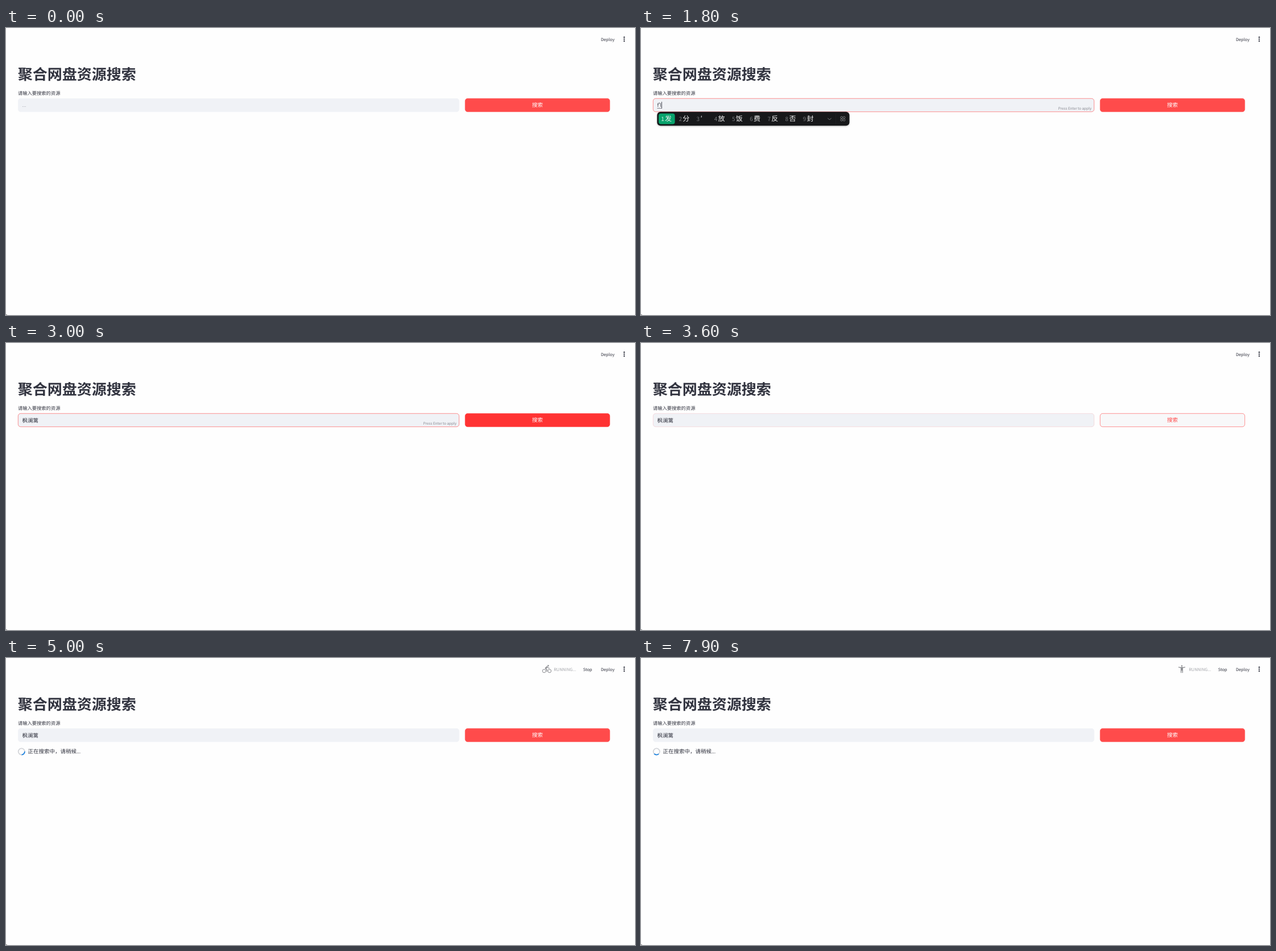
Recreate the animation shown at these times as an HTML page. Size 1106 px wide and 506 px high, loop 8 s.

```html
<!DOCTYPE html>
<html lang="zh-CN">
<head>
<meta charset="utf-8">
<title>聚合网盘资源搜索</title>
<style>
  html, body { margin: 0; width: 100%; height: 100%; overflow: hidden; background: #fefefe; }
  svg { display: block; width: 100%; height: 100%; }
  text {
    font-family: "Noto Sans CJK SC", "Noto Sans CJK", "Noto Sans", sans-serif;
    white-space: pre; text-rendering: geometricPrecision;
  }
</style>
</head>
<body>
<svg id="stage" viewBox="0 0 1106 506"></svg>
<script>
const LOOP = 8000, STEP = 100;
const INK = '#31333f', RED = '#ff4b4b', HOVER = '#ff3333';
const WORD = '枫澜篱';

// Toolbar figures on a 24 unit grid
const wheel = x => `M${x} 12c-2.8 0-5 2.2-5 5s2.2 5 5 5 5-2.2 5-5-2.2-5-5-5z` +
  'm0 8.5c-1.9 0-3.5-1.6-3.5-3.5s1.6-3.5 3.5-3.5 3.5 1.6 3.5 3.5-1.6 3.5-3.5 3.5z';
const head = (x, y) => `M${x} ${y}a2 2 0 1 0 0-4 2 2 0 0 0 0 4z`;
const FIGURES = {
  stand: head(12, 6) + 'M20.5 6c-2.6.7-5.7 1-8.5 1s-5.9-.3-8.5-1L3 8c1.9.5 4 .8 6 1v13h2v-6h2v6h2V9c2-.2 4.1-.5 6-1z',
  bike: head(15.5, 5.5) + wheel(5) + wheel(19) +
    'M10.8 10.5l2.4-2.4.8.8c1.3 1.3 3 2.1 5.1 2.1V9c-1.5 0-2.7-.6-3.6-1.5l-1.9-1.9c-.5-.4-1-.6-1.6-.6' +
    's-1.1.2-1.4.6L7.8 8.4c-.4.4-.6.9-.6 1.4 0 .6.2 1.1.6 1.4L11 14v5h2v-6.2z',
  run: head(13.5, 5.5) + 'M9.9 19.4l1-4.4 2.1 2v6h2v-7.5l-2.1-2 .6-3c1.3 1.5 3.3 2.5 5.5 2.5v-2c-1.9 0-3.5-1-4.3-2.4' +
    'l-1-1.6c-.4-.6-1-1-1.7-1-.3 0-.5.1-.8.1L6 8.3V13h2V9.6l1.8-.7L8.2 17l-4.9-1-.4 2z'
};

const stage = document.getElementById('stage');

function add(tag, attrs, parent = stage, content = '') {
  const el = document.createElementNS('http://www.w3.org/2000/svg', tag);
  set(el, attrs);
  el.textContent = content;
  parent.append(el);
  return el;
}
function set(el, attrs) {
  for (const k in attrs) el.setAttribute(k, attrs[k]);
}
const label = (str, x, y, size, fill = INK, parent = stage, more = {}) =>
  add('text', { x, y, 'font-size': size, fill, ...more }, parent, str);
const show = (el, on) => el.setAttribute('visibility', on ? 'visible' : 'hidden');
const between = (t, a, b) => t >= a && t < b;
const clamp = v => Math.max(0, Math.min(1, v));

// Rounded box whose hairline border lies inside its edges
const box = (x, width, attrs) => add('rect', {
  x: x + 0.3, y: 124.3, width: width - 0.6, height: 23.4, rx: 4.5, 'stroke-width': 0.6, ...attrs
});

// Page
add('rect', { width: 1106, height: 506, fill: '#fefefe' });
add('rect', { y: 505, width: 2, height: 1, fill: '#888' });
label('Deploy', 1046, 22.5, 7.35);
for (const y of [16.2, 19.6, 23]) add('circle', { cx: 1087, cy: y, r: 1.2, fill: INK });
label('聚合网盘资源搜索', 20.8, 91.1, 26, INK, stage, { 'font-weight': 700 });
label('请输入要搜索的资源', 21, 117.6, 8.27);

// Input
box(21, 776, { fill: '#f0f2f6', stroke: '#f0f2f6' });
const ring = box(21, 776, { fill: 'none', stroke: RED });
const hint = label('...', 28.3, 139.2, 8.5, '#a3a5ad');
const typed = label('', 28.4, 139.4, 8.5);
const under = add('rect', { x: 28.4, y: 141.3, height: 0.6, fill: INK });
const value = label(WORD, 28.4, 139.5, 9.5);
const caret = add('rect', { y: 130, width: 0.8, height: 12, fill: INK });
const apply = label('Press Enter to apply', 792, 143.9, 6.3, '#83858d', stage, { 'text-anchor': 'end' });

// Button
const button = box(807, 255, {});
const buttonText = label('搜索', 934.4, 139.1, 9.5, '#fff', stage, { 'text-anchor': 'middle' });

// Candidate popup
function makePopup(words) {
  const g = add('g', {});
  add('rect', { x: 28.3, y: 147.8, width: 338.2, height: 24.4, rx: 6, fill: '#17181a',
    style: 'filter:drop-shadow(0 1px 1.5px rgba(0,0,0,.25))' }, g);
  add('rect', { x: 31, y: 150.7, width: 16.6 + 12 * words[0].length, height: 18.8, rx: 4, fill: '#08a36c' }, g);
  let x = 35.2;
  words.forEach((word, i) => {
    label(i + 1, x, 163.8, 10, i ? '#77797c' : '#d5f3e6', g, { 'font-weight': 300 });
    label(word, x + 6.8, 164.4, 12, '#f4f4f4', g, { 'font-weight': 300 });
    x += 19.2 + 12 * word.length;
  });
  const line = { fill: 'none', stroke: '#85878a', 'stroke-width': 0.9 };
  add('path', { d: 'M328.3 158.8l3.2 3.2 3.2-3.2', ...line }, g);
  add('rect', { x: 342, y: 151, width: 0.6, height: 18, fill: '#242527' }, g);
  for (const cx of [352.7, 357.1])
    for (const cy of [157.8, 162.2]) add('rect', { x: cx - 1.7, y: cy - 1.7, width: 3.4, height: 3.4, rx: 1.3, ...line }, g);
  return g;
}
const letters = makePopup(['发', '分', '′', '放', '饭', '费', '反', '否', '封']);
const phrase = makePopup([WORD, '发', '分', '放', '饭', '费', '反', '否']);

// Running state
const running = add('g', {});
const figure = add('path', { transform: 'translate(942.8 11.3) scale(.68)', fill: '#919296', 'fill-rule': 'evenodd' }, running);
label('RUNNING...', 963.2, 22.5, 7.35, '#a3a5aa', running);
label('Stop', 1014.8, 22.5, 7.35, INK, running);
const track = { cx: 27.3, cy: 165, r: 5.6, fill: 'none', 'stroke-width': 1.8 };
add('circle', { ...track, stroke: '#d3d5d9' }, running);
const arc = add('circle', { ...track, stroke: '#1c83e1', pathLength: 4, 'stroke-dasharray': '1 3' }, running);
const busy = label('正在搜索中，请稍候', 38.4, 168.3, 9.5, INK, running);
add('tspan', { 'font-size': 8.5 }, busy, '...');

function draw(time) {
  const t = Math.floor((time % LOOP) / STEP) * STEP;
  const composing = between(t, 1800, 2400);
  const pressed = between(t, 3400, 4400);

  // Focus ring fades in and out
  set(ring, { opacity: t < 3400 ? clamp((t - 900) / 300) : clamp((3700 - t) / 400) });
  show(ring, between(t, 1000, 3700));
  show(hint, t < 1800);
  show(apply, between(t, 1800, 3400));

  typed.textContent = t < 1900 ? "f'l" : "f'l'l";
  const width = t < 1900 ? 7.8 : 12.4;
  show(typed, composing);
  show(under, composing);
  set(under, { width });
  show(letters, between(t, 1800, 2000));
  show(phrase, between(t, 2000, 2400));
  show(value, t >= 2400);

  set(caret, { x: composing ? 28.4 + width : t < 1800 ? 28.2 : 57.2 });
  show(caret, composing || between(t, 1100, 1600) || between(t, 2500, 3000));

  const fill = between(t, 3000, 3400) ? HOVER : RED;
  set(button, { fill: pressed ? '#f8f8f9' : fill, stroke: fill });
  set(buttonText, { fill: pressed ? RED : '#fff' });

  show(running, t >= 4100);
  const beat = (t / STEP) % 11;
  set(figure, { d: FIGURES[beat < 4 ? 'stand' : beat < 8 ? 'bike' : 'run'] });
  const turn = ((t - 4200) / STEP * 101 - 90) % 360;
  set(arc, { transform: `rotate(${turn} ${track.cx} ${track.cy})` });
}

const start = performance.now();
function tick() {
  draw(performance.now() - start);
  requestAnimationFrame(tick);
}
tick();
</script>
</body>
</html>
```
